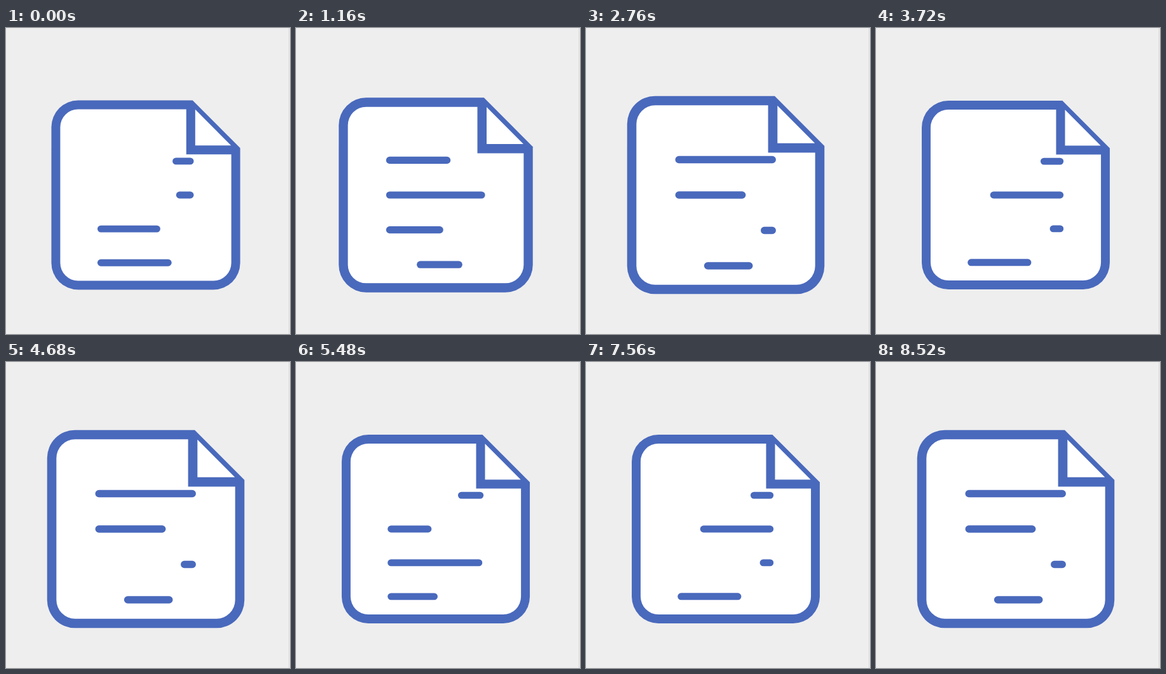
Write an HTML page with a canvas that moves like this. It is 447 by 480 pixels and loops after 8560 ms.

```html
<!DOCTYPE html>
<html lang="en">
<head>
<meta charset="utf-8">
<title>Writing document</title>
<style>
html, body { margin: 0; width: 447px; height: 480px; overflow: hidden; background: #eee; }
canvas { display: block; width: 447px; height: 480px; }
</style>
</head>
<body>
<canvas id="stage" width="447" height="480"></canvas>
<script>
const ctx = document.getElementById('stage').getContext('2d');
const LOOP = 8560, STEP = 40, CYCLE = 1920;
const BLUE = '#4969bc', WHITE = '#fff', BACK = '#eee';
const HALF = 155.25, EDGE = 14.6, INNER = HALF - EDGE, RADIUS = 44;

// Stroke progress per line: 0 to 1 writes it, 1 to 2 wipes it to the right; it then starts over.
const KEYS = [0, 840, 1160, 1640, CYCLE];
const LINES = [
  { y: -55.5, end: 73.2, stops: [1.84, 3, 4.624, 5.79, 5.84] },
  { y: 0, end: 73.2, stops: [1.88, 2.677, 3, 4.416, 5.88] },
  { y: 55.5, end: 73.2, stops: [0.626, 1.915, 2.545, 2.986, 4.626] },
  { y: 111, end: 36.8, stops: [1, 1.41, 1.444, 2.644, 3] }
];
const START = -73.8;

function progress(stops, t) {
  let i = 0;
  while (t >= KEYS[i + 1]) i++;
  const k = (t - KEYS[i]) / (KEYS[i + 1] - KEYS[i]);
  return (stops[i] + (stops[i + 1] - stops[i]) * k) % 2;
}

function fillPoly(points, color) {
  ctx.beginPath();
  points.forEach(([x, y]) => ctx.lineTo(x, y));
  ctx.closePath();
  ctx.fillStyle = color;
  ctx.fill();
}

// Three rounded corners, with the given points in place of the top right one.
function fillSheet(h, r, corner, color) {
  ctx.beginPath();
  ctx.moveTo(-h + r, -h);
  corner.forEach(([x, y]) => ctx.lineTo(x, y));
  ctx.arcTo(h, h, -h, h, r);
  ctx.arcTo(-h, h, -h, -h, r);
  ctx.arcTo(-h, -h, h, -h, r);
  ctx.closePath();
  ctx.fillStyle = color;
  ctx.fill();
}

function drawLine(line, t) {
  const p = progress(line.stops, t);
  const at = k => START + (line.end - START) * k;
  const from = at(Math.max(0, p - 1)), to = at(Math.min(1, p));
  if (to - from < 0.05) return;
  ctx.beginPath();
  ctx.moveTo(from, line.y);
  ctx.lineTo(to, line.y);
  ctx.stroke();
}

function draw(time) {
  const t = time % CYCLE;
  const width = 303.25 + 7.5 * Math.cos(2 * Math.PI * (t - 770) / CYCLE);
  const s = width / (2 * HALF);

  ctx.setTransform(1, 0, 0, 1, 0, 0);
  ctx.fillStyle = BACK;
  ctx.fillRect(0, 0, 447, 480);
  ctx.fillStyle = '#d8d8d8';
  ctx.fillRect(445, 0, 1, 480);

  ctx.setTransform(s, 0, 0, s, 220, 262);
  fillSheet(HALF, RADIUS, [[77, -HALF], [HALF, -77]], BLUE);
  fillSheet(INNER, RADIUS - EDGE, [[66.6, -INNER], [66.6, -66.6], [INNER, -66.6]], WHITE);
  fillPoly([[81.3, -140.2], [81.3, -81.3], [140.2, -81.3]], WHITE);

  ctx.strokeStyle = BLUE;
  ctx.lineWidth = 11.4;
  ctx.lineCap = 'round';
  LINES.forEach(line => drawLine(line, t));
}

const begin = performance.now();
function tick() {
  const time = (performance.now() - begin) % LOOP;
  draw(Math.floor(time / STEP) * STEP);
  requestAnimationFrame(tick);
}
tick();
</script>
</body>
</html>
```
